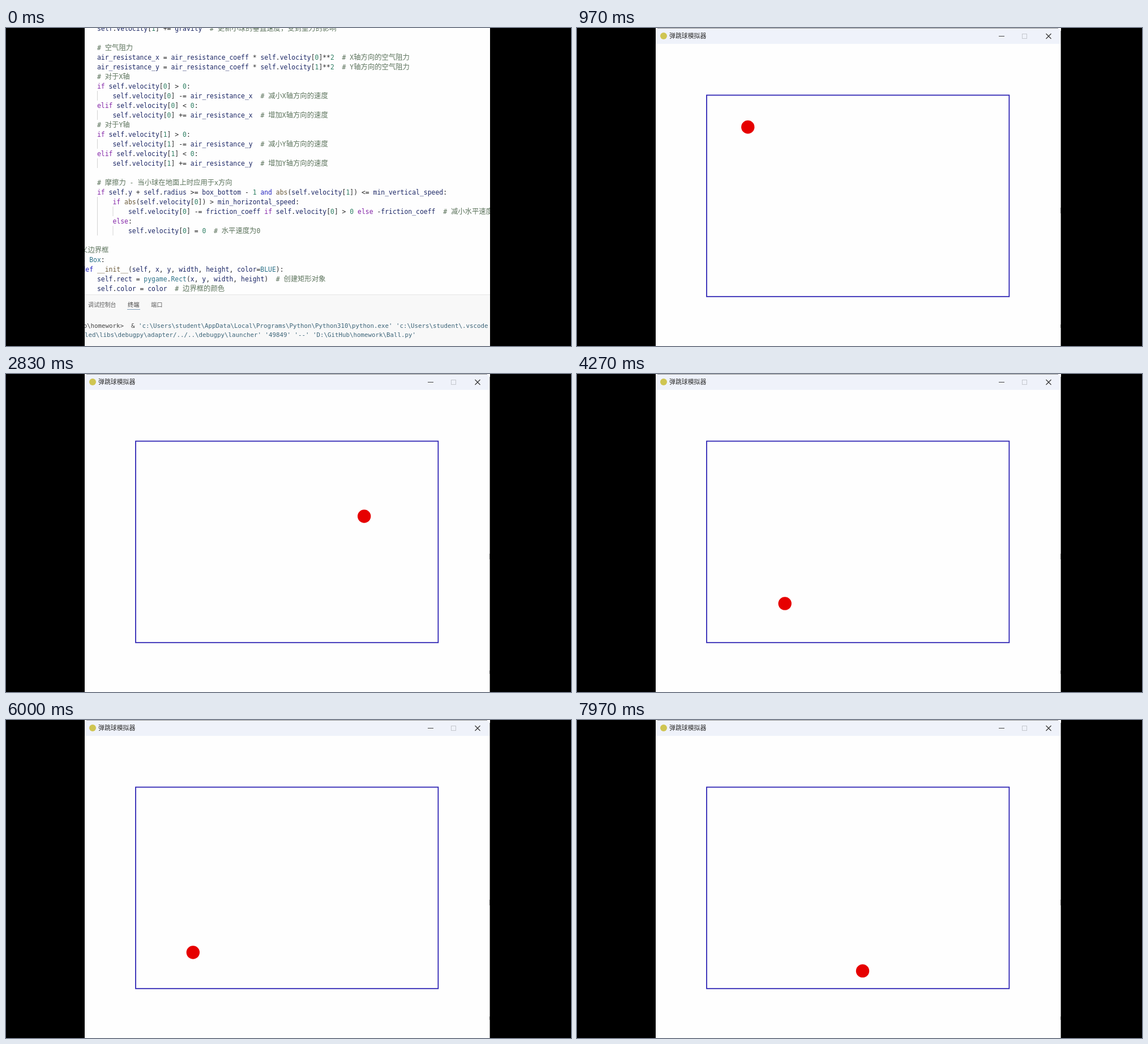
These frames come from a looping animation (998x561 px, 8 s). An HTML page with a canvas:

```html
<!DOCTYPE html>
<html lang="zh">
<head>
<meta charset="utf-8">
<title>Bouncing ball</title>
<style>
html, body { margin: 0; width: 100%; height: 100%; overflow: hidden; background: #000; }
canvas { display: block; }
</style>
</head>
<body>
<canvas id="stage" width="998" height="561"></canvas>
<script>
const ctx = document.getElementById('stage').getContext('2d');
const LOOP = 8;
const VIEW = { x: 139, y: 0, w: 716, h: 561 };

const MONO = '"DejaVu Sans Mono", monospace';
const CJK = '"Noto Sans CJK SC", "Noto Sans CJK", sans-serif';
const INK = {
  comment: '#5c735c', keyword: '#8426a8', word: '#2424c0', name: '#1c2766',
  func: '#6b5a3a', number: '#2f7f63', type: '#2c7288', op: '#2a2a2a'
};

// [row, column, text]
const CODE = [
  [0, 8, 'self.velocity[1] += gravity  # 更新小球的垂直速度，受到重力的影响'],
  [2, 8, '# 空气阻力'],
  [3, 8, 'air_resistance_x = air_resistance_coeff * self.velocity[0]**2  # X轴方向的空气阻力'],
  [4, 8, 'air_resistance_y = air_resistance_coeff * self.velocity[1]**2  # Y轴方向的空气阻力'],
  [5, 8, '# 对于X轴'],
  [6, 8, 'if self.velocity[0] > 0:'],
  [7, 12, 'self.velocity[0] -= air_resistance_x  # 减小X轴方向的速度'],
  [8, 8, 'elif self.velocity[0] < 0:'],
  [9, 12, 'self.velocity[0] += air_resistance_x  # 增加X轴方向的速度'],
  [10, 8, '# 对于Y轴'],
  [11, 8, 'if self.velocity[1] > 0:'],
  [12, 12, 'self.velocity[1] -= air_resistance_y  # 减小Y轴方向的速度'],
  [13, 8, 'elif self.velocity[1] < 0:'],
  [14, 12, 'self.velocity[1] += air_resistance_y  # 增加Y轴方向的速度'],
  [16, 8, '# 摩擦力 - 当小球在地面上时应用于x方向'],
  [17, 8, 'if self.y + self.radius >= box_bottom - 1 and abs(self.velocity[1]) <= min_vertical_speed:'],
  [18, 12, 'if abs(self.velocity[0]) > min_horizontal_speed:'],
  [19, 16, 'self.velocity[0] -= friction_coeff if self.velocity[0] > 0 else -friction_coeff  # 减小水平速度'],
  [20, 12, 'else:'],
  [21, 16, 'self.velocity[0] = 0  # 水平速度为0'],
  [23, 0, '# 定义边界框'],
  [24, 0, 'class Box:'],
  [25, 4, 'def __init__(self, x, y, width, height, color=BLUE):'],
  [26, 8, 'self.rect = pygame.Rect(x, y, width, height)  # 创建矩形对象'],
  [27, 8, 'self.color = color  # 边界框的颜色']
];

function kindOf(token) {
  if (token[0] === '#') return 'comment';
  if (/^(if|elif|else)$/.test(token)) return 'keyword';
  if (/^(and|def|class)$/.test(token)) return 'word';
  if (/^(abs|__init__)$/.test(token)) return 'func';
  if (/^(pygame|Rect|Box|BLUE)$/.test(token)) return 'type';
  if (/^\d/.test(token)) return 'number';
  return /^\w/.test(token) ? 'name' : 'op';
}

// Draws text that mixes narrow and wide glyphs and returns the end position.
function write(text, x, y, latin, wide, color) {
  ctx.fillStyle = color;
  for (const run of text.match(/[\u3000-\uffef]+|[^\u3000-\uffef]+/g)) {
    ctx.font = run.charCodeAt(0) >= 0x3000 ? `${wide}px ${CJK}` : `${latin}px ${MONO}`;
    ctx.fillText(run, x, y);
    x += ctx.measureText(run).width;
  }
  return x;
}

function rect(x, y, w, h, color) {
  ctx.fillStyle = color;
  ctx.fillRect(x, y, w, h);
}

function line(color, width, ...points) {
  ctx.strokeStyle = color;
  ctx.lineWidth = width;
  ctx.beginPath();
  for (let i = 0; i < points.length; i += 4) {
    ctx.moveTo(points[i], points[i + 1]);
    ctx.lineTo(points[i + 2], points[i + 3]);
  }
  ctx.stroke();
}

function disc(x, y, r, color) {
  ctx.fillStyle = color;
  ctx.beginPath();
  ctx.arc(x, y, r, 0, Math.PI * 2);
  ctx.fill();
}

function drawEditor() {
  rect(VIEW.x, VIEW.y, VIEW.w, VIEW.h, '#fefefe');
  for (const [row, col, text] of CODE) {
    const y = 4.6 + row * 17;
    let x = 106 + col * 6.87;
    for (const token of text.match(/#.*|\w+|\s+|[^\w\s#]+/g)) {
      x = write(token, x, y, 11.41, 12.35, INK[kindOf(token)]);
    }
    for (let guide = 8; guide < col; guide += 4) {
      const gx = 106.5 + guide * 6.87;
      line('#d4d4d4', 1, gx, row * 17 - 8, gx, row * 17 + 9);
    }
  }

  rect(VIEW.x, 470, VIEW.w, 91, '#f8f8f8');
  rect(VIEW.x, 470, VIEW.w, 1, '#e6e6e6');
  write('调试控制台', 145, 491.5, 10, 9.9, '#5e5e5e');
  write('终端', 215, 491.5, 10, 10.3, '#3c3c3c');
  write('端口', 256, 491.5, 10, 10.3, '#5e5e5e');
  rect(214, 496, 23, 1, '#7f9db8');

  const x = write('b\\homework>  & ', 136.5, 529, 10.8, 10.8, '#444');
  write("'c:\\Users\\student\\AppData\\Local\\Programs\\Python\\Python310\\python.exe' 'c:\\Users\\student\\.vscode",
    x, 529, 10.8, 10.8, '#3c6478');
  write("led\\libs\\debugpy\\adapter/../..\\debugpy\\launcher' '49849' '--' 'D:\\GitHub\\homework\\Ball.py'",
    139, 545, 10.8, 10.8, '#3c6478');
}

function drawWindow() {
  ctx.fillStyle = '#fefefe';
  ctx.beginPath();
  ctx.roundRect(139, 1, 715, 570, [5, 5, 0, 0]);
  ctx.fill();
  ctx.fillStyle = '#eff2fa';
  ctx.beginPath();
  ctx.roundRect(139, 1, 715, 27, [5, 5, 0, 0]);
  ctx.fill();
  line('#9a9a9a', 1, 142, 0.5, 850, 0.5, 854.5, 5, 854.5, 561);
  line('#555', 1, 854.5, 317, 854.5, 327, 854.5, 523, 854.5, 529);

  disc(153, 14, 6, '#cfc552');
  write('弹跳球模拟器', 163, 18, 11, 10.9, '#2b2b2b');
  line('#444', 1, 745, 14.5, 755, 14.5);
  ctx.strokeStyle = '#c4c7cd';
  ctx.strokeRect(786.5, 10.5, 8, 8);
  line('#333', 1.2, 828.5, 10, 837.5, 19, 837.5, 10, 828.5, 19);

  ctx.strokeStyle = '#2f25b4';
  ctx.lineWidth = 1.8;
  ctx.strokeRect(229, 118.5, 534.4, 355.3);
}

// Ball motion: gravity with drag proportional to the squared speed.
const DRAG = 1 / 699;
const FALL = 0.69;
const FLOOR = 462;
const START = 0.775;
// [launch time, apex time, apex height]
const HOPS = [
  [1.727, 2.825, 211],
  [4.015, 4.785, 102],
  [5.6, 6.19, 58],
  [6.787, 7.248, 36],
  [7.717, 8.065, 20.8]
];

const glide = (speed, s) => Math.log(1 + DRAG * speed * s) / DRAG;

function ballX(t) {
  if (t < 2.342) {
    const s = t - 0.97;
    return 301.5 + 307 * s + 15.6 * s * s;
  }
  return t < 5.17 ? 752 - glide(266, t - 2.342) : 241.5 + glide(114, t - 5.17);
}

function ballY(t) {
  const hop = HOPS.filter(h => h[0] <= t).pop();
  if (!hop) {
    const s = t - 0.97;
    return Math.min(FLOOR, 174.5 + 250 * s + 177 * s * s);
  }
  const [, apex, height] = hop;
  const phase = FALL * (t - apex);
  const drop = phase < 0 ? -Math.log(Math.cos(phase)) : Math.log(Math.cosh(phase));
  return Math.min(FLOOR, FLOOR - height + drop / DRAG);
}

const OPEN = 0.56;
const OPEN_TIME = 0.16;

function draw(t) {
  rect(0, 0, 998, 561, '#000');
  ctx.save();
  ctx.beginPath();
  ctx.rect(VIEW.x, VIEW.y, VIEW.w, VIEW.h);
  ctx.clip();
  drawEditor();
  if (t >= OPEN) {
    const p = Math.min(1, (t - OPEN) / OPEN_TIME);
    const scale = 1 - 0.08 * (1 - p) ** 3;
    ctx.globalAlpha = p;
    ctx.translate(497, 280);
    ctx.scale(scale, scale);
    ctx.translate(-497, -280);
    drawWindow();
    const bt = Math.max(t, START);
    disc(ballX(bt), ballY(bt), 11.7, '#e60000');
  }
  ctx.restore();
}

const begin = performance.now();
function tick() {
  draw((performance.now() - begin) / 1000 % LOOP);
  requestAnimationFrame(tick);
}
tick();
</script>
</body>
</html>
```
